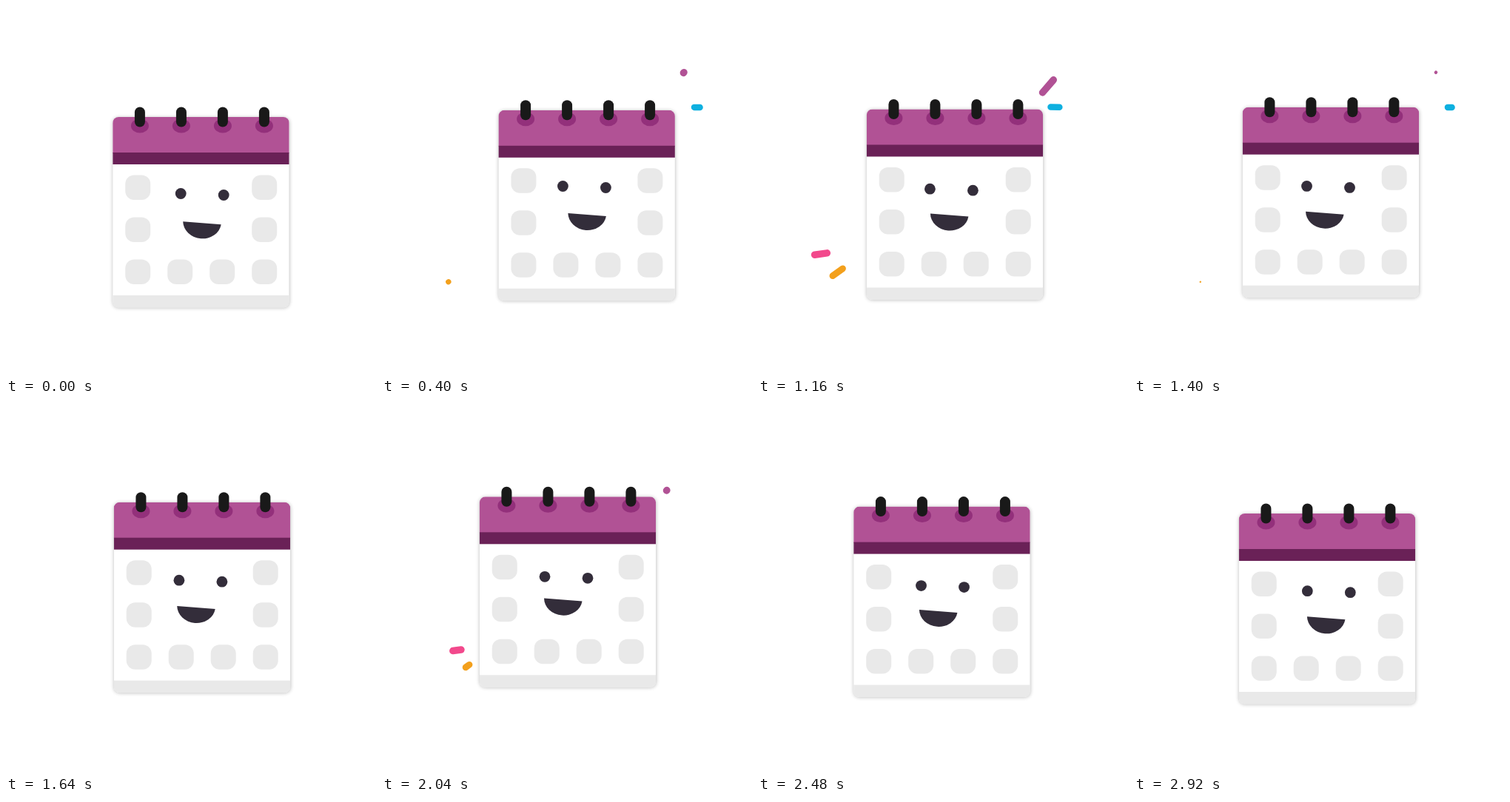
Recreate the animation shown at these times as an HTML page. Size 500x500 px, loop 2960 ms.

```html
<!DOCTYPE html>
<html lang="en">
<head>
<meta charset="utf-8">
<title>Happy calendar</title>
<style>
  html, body { margin: 0; width: 100%; height: 100%; overflow: hidden; background: #fff; }
  svg { display: block; width: 100vw; height: 100vh; }
</style>
</head>
<body>
<svg id="stage" viewBox="0 0 500 500">
  <defs>
    <clipPath id="round"><rect width="238.5" height="257.5" rx="8"/></clipPath>
    <filter id="blur" x="-10%" y="-10%" width="120%" height="120%"><feGaussianBlur stdDeviation="2.6"/></filter>
  </defs>
  <g id="confetti" fill="none" stroke-linecap="round"></g>
  <g id="card">
    <rect y=".5" width="239" height="257.5" rx="8" fill="#000" opacity=".25" filter="url(#blur)"/>
    <g clip-path="url(#round)">
      <rect width="238.5" height="257.5" fill="#fff"/>
      <rect width="238.5" height="49" fill="#b15295"/>
      <rect y="48" width="238.5" height="16" fill="#6a2157"/>
      <rect y="241" width="238.5" height="17" fill="#e9e9e9"/>
    </g>
    <g id="cells" fill="#e9e9e9"></g>
    <g id="rings"></g>
    <g id="eyes" fill="#332d3a">
      <circle r="7.4"/>
      <circle cx="58" cy="2" r="7.4"/>
    </g>
    <path id="mouth" fill="#332d3a" d="M0 0L51.5 4A25.9 22.7 4.4 0 1 0 0Z"/>
  </g>
</svg>
<script>
const LOOP = 2960, STEP = 40, BEAT = LOOP / 3;
const $ = id => document.getElementById(id);

function add(parent, tag, attrs) {
  const el = document.createElementNS('http://www.w3.org/2000/svg', tag);
  for (const k in attrs) el.setAttribute(k, attrs[k]);
  return parent.appendChild(el);
}

for (let row = 0; row < 3; row++)
  for (let col = 0; col < 4; col++)
    if (row === 2 || col % 3 === 0)
      add($('cells'), 'rect', { x: 17 + col * 57, y: 78.5 + row * 57, width: 34, height: 33.5, rx: 12 });

for (let i = 0; i < 4; i++) {
  const x = 36.7 + i * 56;
  add($('rings'), 'ellipse', { cx: x, cy: 12, rx: 12, ry: 9.5, fill: '#93307b' });
  add($('rings'), 'rect', { x: x - 7, y: -13.5, width: 14, height: 27, rx: 7, fill: '#191919' });
}

// Drift of the card, and of eyes and mouth inside it
const times = [0, 400, 1160, 1640, 2040, 2480, 2920];
const drift = {
  card: [[144.2, 157.4, 146.7, 145.7, 131.7, 129.2, 141.7], [150, 140.8, 139.5, 132.7, 125.3, 138.6, 148]],
  eyes: [[92, 87, 85.7, 88.2, 88.3, 91.3, 92.6], [103.5, 102.7, 107.7, 105.5, 108, 107, 104.7]],
  mouth: [[95, 94, 86.2, 85.5, 87.3, 88.7, 92.2], [141.3, 139.2, 141, 140.3, 137.3, 139.3, 139.3]]
};

// Smooth closed curve through the keyed values
function curve(values, t) {
  const n = times.length;
  const wrap = i => (i + n) % n;
  const at = i => times[wrap(i)] + Math.floor(i / n) * LOOP;
  const val = i => values[wrap(i)];
  const slope = i => (val(i + 1) - val(i - 1)) / (at(i + 1) - at(i - 1));
  let i = n - 1;
  while (times[i] > t) i--;
  const h = at(i + 1) - at(i), u = (t - at(i)) / h, v = 1 - u;
  return v * v * (1 + 2 * u) * val(i) + u * u * (3 - 2 * u) * val(i + 1)
    + h * u * v * (v * slope(i) - u * slope(i + 1));
}

const linear = u => u;
const sine = u => (1 - Math.cos(Math.PI * u)) / 2;
const part = (t, [from, to]) => Math.min(1, Math.max(0, (t - from) / (to - from)));

// Each streak grows by its head, then its tail catches up
const streaks = [
  { color: '#b15295', width: 9.5, a: [384.5, 117], b: [408, 89.7], head: [50, 262], tail: [180, 425], ease: sine },
  { color: '#0eb0e0', width: 8.5, a: [395.5, 136.5], b: [429.5, 137], head: [110, 268], tail: [200, 490], ease: sine },
  { color: '#f2498c', width: 9.5, a: [107, 332], b: [70.5, 337], head: [5, 207], tail: [60, 330], ease: linear },
  { color: '#f3a01c', width: 8.8, a: [118, 352.3], b: [89.7, 372.8], head: [24, 272], tail: [100, 420], ease: linear }
];
for (const s of streaks) s.el = add($('confetti'), 'line', { stroke: s.color });

function drawStreak(s, t) {
  const on = t > s.head[0] && t < s.tail[1];
  s.el.setAttribute('visibility', on ? 'visible' : 'hidden');
  if (!on) return;
  const point = u => s.a.map((p, i) => p + (s.b[i] - p) * u);
  const [x1, y1] = point(sine(part(t, s.tail)));
  const [x2, y2] = point(s.ease(part(t, s.head)) + 0.002);
  const width = s.width * Math.min(1, (s.tail[1] - t) / 25);
  const attrs = { x1, y1, x2, y2, 'stroke-width': width };
  for (const k in attrs) s.el.setAttribute(k, attrs[k]);
}

function draw(t) {
  for (const id in drift) {
    const [x, y] = drift[id].map(v => curve(v, t).toFixed(2));
    $(id).setAttribute('transform', `translate(${x} ${y})`);
  }
  for (const s of streaks) drawStreak(s, t % BEAT);
}

const start = performance.now();
function tick() {
  const t = (performance.now() - start) % LOOP;
  draw(Math.floor(t / STEP) * STEP);
  requestAnimationFrame(tick);
}
tick();
</script>
</body>
</html>
```
